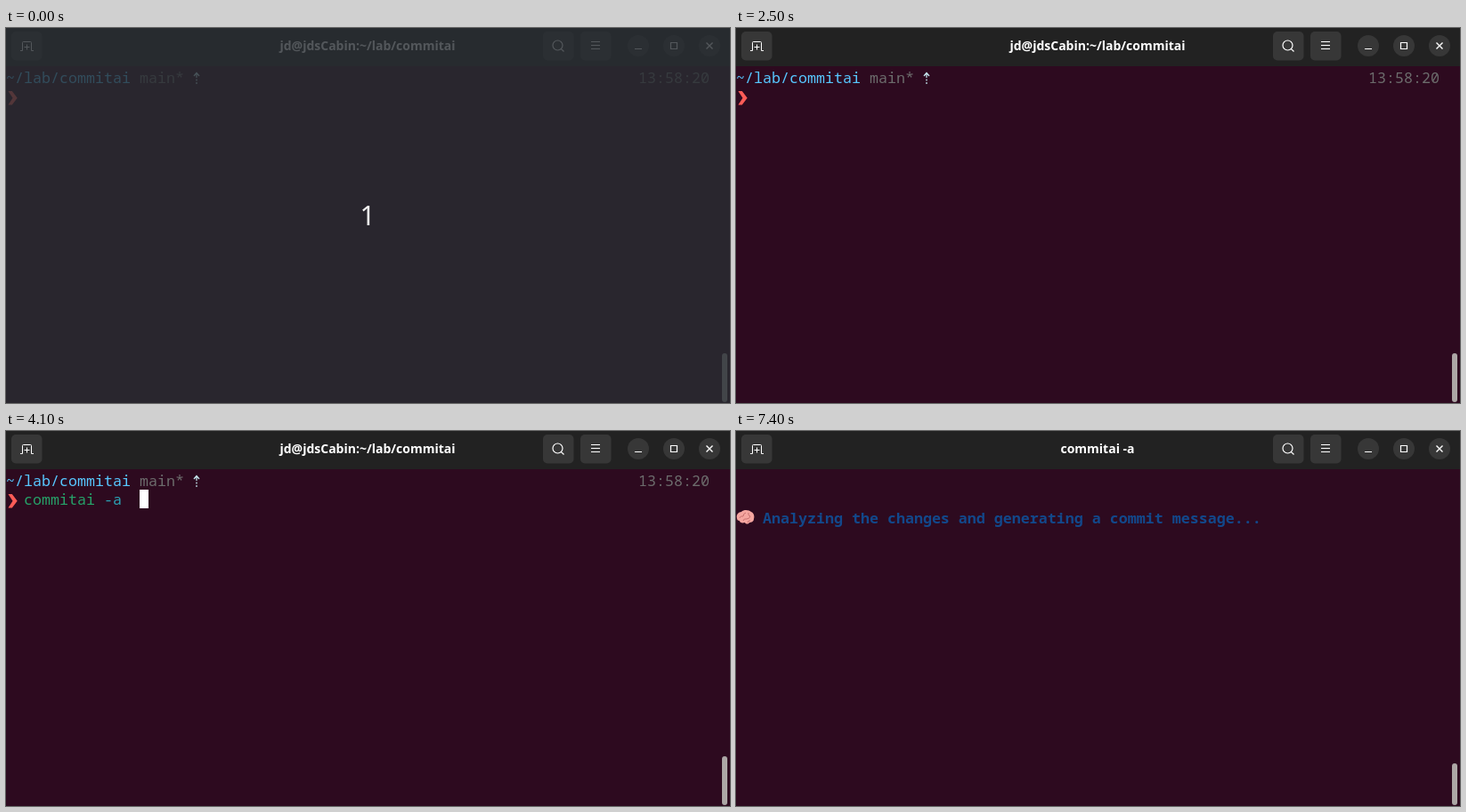
These frames come from a looping animation (813 by 422 pixels, 8000 ms). An HTML page with a canvas:

```html
<!DOCTYPE html>
<html lang="en">
<head>
<meta charset="utf-8">
<title>Terminal session</title>
<style>
  html, body { margin: 0; width: 100%; height: 100%; overflow: hidden; background: #2d0a1f; }
  canvas { display: block; }
</style>
</head>
<body>
<canvas width="813" height="422"></canvas>
<script>
const ctx = document.querySelector('canvas').getContext('2d');
const LOOP = 8000, CELL = 10, ROW = 21, TOP = 45;
const BG = '#2d0a1f', WHITE = '#fff', GREY = '#6c6c6c', RED = '#ff5c57', SKY = '#57c7ff',
  GREEN = '#26a269', CYAN = '#2aa1b3', BLUE = '#2a7bde', NAVY = '#12488b', BROWN = '#a2734c';

const history = ['git reset HEAD~1', 'commitai -a', 'git add .', 'git commit --amend', 'cd lab',
  'cd CodeConcat', 'cd ../commitai', 'commitai -a', 'git reset HEAD~1'];
const resetCommand = [['git ', GREEN], ['reset ', BROWN], ['HEAD~1', BLUE], [';', WHITE]];
const aiCommand = [['commitai ', GREEN], ['-a ', CYAN]];

const rowTop = row => TOP + row * ROW;

function rect(x, y, w, h, color, radius = 0) {
  ctx.fillStyle = color;
  ctx.beginPath();
  ctx.roundRect(x, y, w, h, radius);
  ctx.fill();
}

function fillPath(d, color) {
  ctx.fillStyle = color;
  ctx.fill(new Path2D(d));
}

function strokePath(d, color, width = 1) {
  ctx.strokeStyle = color;
  ctx.lineWidth = width;
  ctx.stroke(new Path2D(d));
}

function label(text, x, y, font, color = WHITE) {
  ctx.font = font;
  ctx.textAlign = 'center';
  ctx.fillStyle = color;
  ctx.fillText(text, x, y);
}

function print(text, col, row, color, weight = 400) {
  ctx.font = weight + ' 16.667px "Noto Sans Mono", monospace';
  ctx.textAlign = 'left';
  ctx.fillStyle = color;
  ctx.fillText(text, col * CELL, rowTop(row) + 17);
}

function cursor(col, row) {
  rect(col * CELL, rowTop(row), CELL, ROW, WHITE);
}

function header(title) {
  rect(0, 0, 813, 43, '#222');
  for (const x of [6, 603, 645]) rect(x, 4, 34.5, 32.5, '#373737', 5);
  for (const x of [710, 750, 790]) rect(x - 12, 8, 24, 24, '#373737', 12);
  strokePath('M16 25.5h2.5v-9q0-1 1-1h8q1 0 1 1v9h2.5M20.5 21.5h6M23.5 18.5v6', WHITE);
  strokePath('M625 19.5a5.5 5.5 0 1 0-11 0a5.5 5.5 0 1 0 11 0M623.3 23.3l3.2 3.2', WHITE, 1.2);
  strokePath('M657 15.5h10M657 19.5h10M657 23.5h10', WHITE);
  strokePath('M706 23.5h8M746.5 16.5h7v7h-7z', WHITE, 1.2);
  strokePath('M786.5 16.5l7 7m0-7l-7 7', WHITE, 1.4);
  label(title, 406, 25, '600 14px "Noto Sans", sans-serif');
}

function prompt(row, command = []) {
  const y = rowTop(row) + 5;
  fillPath(`M2.5 ${y}h4.3l5.9 7.8l-5.9 7.8h-4.3l5 -7.8z`, RED);
  let col = 2;
  for (const [text, color] of command) {
    print(text, col, row, color);
    col += text.length;
  }
  return col;
}

function statusLine() {
  print('~/lab/commitai', 0, 0, SKY);
  print('main*', 15, 0, GREY);
  print('13:58:20', 71, 0, GREY);
  strokePath('M211 54l3-3.5l3 3.5M214 51v5M214 57.5v2M214 61v2', '#c9eef5', 1.2);
}

function historyMenu(selected) {
  history.forEach((line, i) => {
    const row = i + 2, active = i === selected;
    if (active) rect(0, rowTop(row), 790, ROW, WHITE);
    print(6392 + i, 1, row, active ? BG : '#aaa0a6');
    print(line, 7, row, active ? BG : WHITE);
  });
}

function magnifier() {
  strokePath('M12.5 99.5l6 5.5', '#5b6266', 3.4);
  ctx.beginPath();
  ctx.arc(8, 95, 5.8, 0, 7);
  ctx.fillStyle = '#a5cbd8';
  ctx.fill();
  ctx.strokeStyle = '#858b8e';
  ctx.lineWidth = 2;
  ctx.stroke();
}

function brain() {
  fillPath('M1 98c-1-4 2-7 5-7c3-3 9-2 11 0c3 1 4 5 3 8c0 3-3 4-5 4c-1 2-4 2-5 0c-3 1-6 0-6-2c-2 0-3-1-3-3z', '#f5a6a0');
  strokePath('M4 98q1-3 4-2q0-3 3-4M8 101q1-3 4-2q3 0 4-3M14 92q-1 3 2 4M13 103q0-2 3-2', '#c9706f');
}

function typingScreen(t) {
  header('jd@jdsCabin:~/lab/commitai');
  statusLine();
  if (t < 3100) {
    prompt(1);
    const blink = t < 2500 ? Math.floor((t + 200) / 600) % 2 : t >= 2800;
    if (blink) cursor(2, 1);
  } else if (t < 3900) {
    const end = prompt(1, resetCommand);
    if (t < 3600) cursor(end, 1);
    historyMenu(8);
  } else {
    const menuOpen = t < 4100;
    prompt(1, menuOpen ? [...aiCommand, [';', WHITE]] : aiCommand);
    cursor(15, 1);
    if (menuOpen) historyMenu(7);
  }
}

function runningScreen(t) {
  header('commitai -a');
  if (t < 5100) {
    prompt(0, aiCommand);
    if (t < 5000) cursor(0, 1);
    else {
      magnifier();
      print('Looking for a native pre-commit hook and running it', 3, 2, NAVY, 700);
    }
  } else {
    brain();
    print('Analyzing the changes and generating a commit message...', 3, 2, NAVY, 700);
    if (Math.floor((t - 5000) / 600) % 2) cursor(0, 5);
  }
}

function draw(now) {
  const t = now % LOOP;
  rect(0, 0, 813, 422, BG);
  if (t < 4400) typingScreen(t);
  else runningScreen(t);

  const thumb = t < 5100 ? 366 : 374;
  rect(804, thumb, 6, 421 - thumb, '#aca6a5', 3);

  if (t < 2500) {
    rect(0, 0, 813, 422, 'rgba(40, 46, 51, 0.8)');
    label('1', 406, 222, '30px "Noto Sans", sans-serif', '#f4f4f4');
  }
  requestAnimationFrame(draw);
}
requestAnimationFrame(draw);
</script>
</body>
</html>
```
